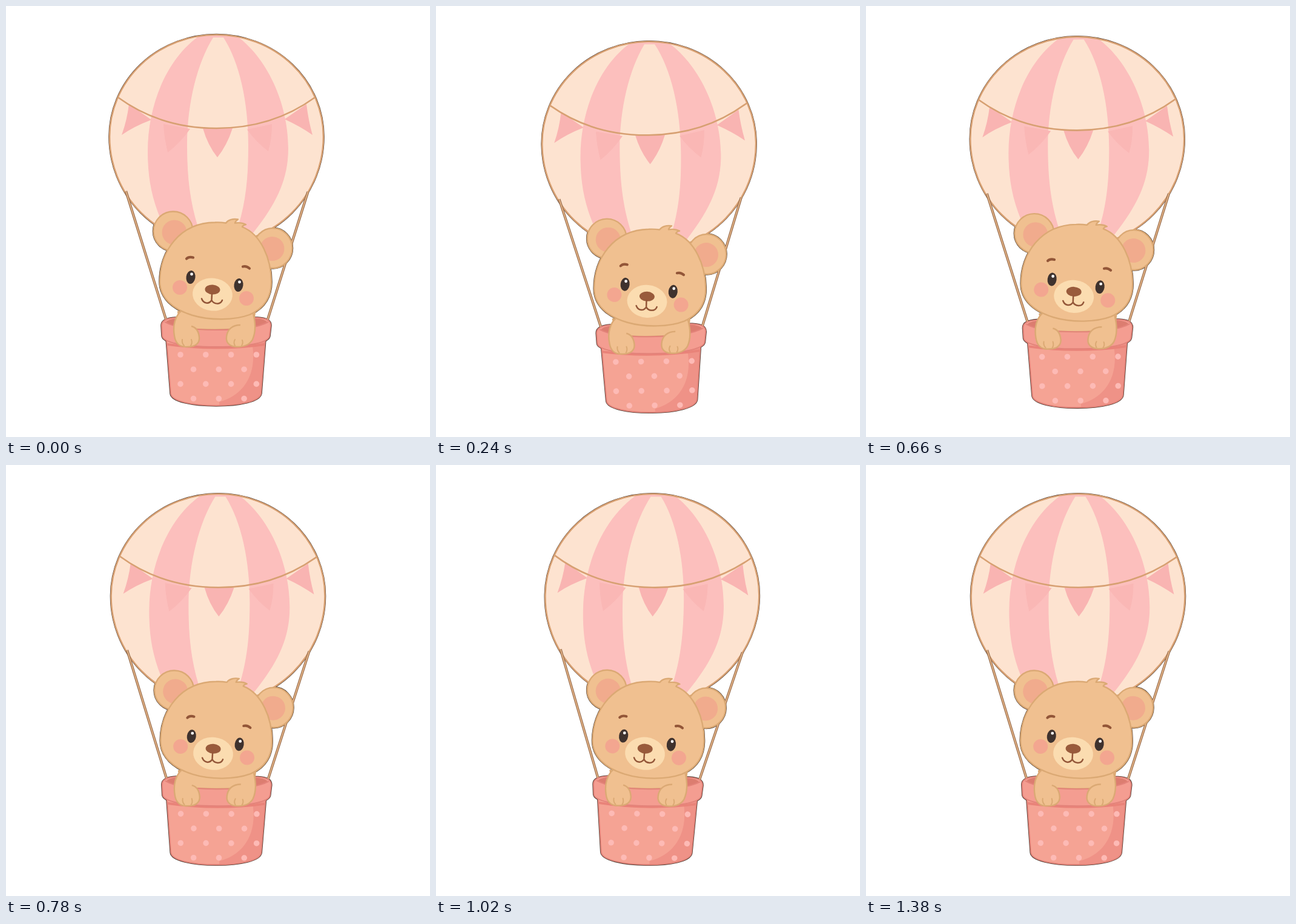
Recreate the animation shown at these times as an HTML page. Size 700 by 712 pixels, loop 1.44 s.

```html
<!DOCTYPE html>
<html lang="en">
<head>
<meta charset="utf-8">
<title>Bear in a balloon</title>
<style>
html, body { margin: 0; width: 100%; height: 100%; overflow: hidden; background: #fff; }
svg { display: block; width: 100vw; height: 100vh; }
.fringe { fill: none; stroke: #4a372d; stroke-width: 3.6; }
.line { fill: none; stroke: #d7a072; stroke-width: 2.6; }
.fur { fill: #f0c090; stroke: #dba974; stroke-width: 2.4; stroke-linejoin: round; }
.stripe { fill: #fcbfbd; }
.flag { fill: #f9b4b2; }
.ear { fill: #f1ab8d; }
.brown { fill: none; stroke: #935638; stroke-width: 2.5; stroke-linecap: round; stroke-linejoin: round; }
.brow { stroke-width: 4.2; }
.rope { fill: none; stroke: #94694a; stroke-width: 4.2; }
.strand { fill: none; stroke: #e3b386; stroke-width: 2; }
.rim { fill: #f49d91; stroke: #e3837a; stroke-width: 2; stroke-linejoin: round; }
.claw { fill: none; stroke: #dba974; stroke-width: 2; stroke-linecap: round; }
</style>
</head>
<body>
<svg viewBox="0 0 700 712">
  <defs>
    <path id="ball" d="M171 216A176.5 168.5 0 0 1 524 216A176.5 177 0 0 1 171 216Z"/>
    <path id="ropes" d="M198 306L264.500 519M498.500 307L431 521"/>
    <circle id="earL" cx="276" cy="372" r="32.500"/>
    <ellipse id="earR" cx="440.500" cy="400" rx="32" ry="33"/>
    <path id="head" d="M254 455C254 405 287 358 345 357.500Q354 357 363 358.500C367 353 375 351 383 352.500Q379 355 378 358.500Q389 357 396 361Q391 362 390 365C421 377 438 418 438 456C438 483 425 500 402 510C378 519 338 520 308 511C275 501 254 482 254 455Z"/>
    <path id="pot" d="M265 550L272 640C273 653 308 660 347 660S419 653 421 640L428 550Z"/>
    <path id="rim" d="M257 528C257 519 266 516 280 515L415 515C430 516 437 519 437 528L435 545C434 555 405 563 347 563S259 555 258 545Z"/>
    <clipPath id="inBall"><use href="#ball"/></clipPath>
    <clipPath id="inPot"><use href="#pot"/></clipPath>
  </defs>
  <rect width="700" height="712" fill="#fff"/>
  <g id="scene">
    <g class="fringe">
      <use href="#ball"/><use href="#earL"/><use href="#earR"/>
      <use href="#head"/><use href="#pot"/><use href="#rim"/>
    </g>

    <use href="#ball" fill="#fde3d0"/>
    <g clip-path="url(#inBall)">
      <path class="stripe" d="M324 46C268 82 234 160 234 240C234 290 242 328 268 380L322 380C304 330 299 285 299 230C299 160 316 94 342 52H359C386 94 400 160 400 230C400 285 396 330 378 380L404 380C444 330 466 290 466 235C466 160 430 82 376 46Z"/>
      <path class="flag" d="M203 162L240 188Q211 199 191 213Q200 188 203 162Z
        M325 202H374Q365 230 349 250Q333 230 325 202Z
        M460 187L496 162Q499 188 506 213Q486 199 460 187Z"/>
      <path fill="#fab7b5" d="M260 195L304 203Q288 226 267 242Q261 218 260 195Z
        M398 204L439 195Q439 220 433 240Q412 224 398 204Z"/>
      <path class="line" d="M185 151Q255 202 347.500 202T510 151"/>
    </g>
    <use href="#ball" class="line"/>
    <use href="#ropes" class="rope"/>
    <use href="#ropes" class="strand"/>

    <use href="#pot" fill="#f5a394"/>
    <g clip-path="url(#inPot)">
      <path fill="#ef9287" d="M430 550L407 562C414 612 390 644 352 654V662H430Z"/>
      <path fill="none" stroke="#e98379" stroke-width="4" d="M260 558Q347 571 434 558"/>
      <g id="dots" fill="#fdbab5"></g>
    </g>
    <use href="#pot" fill="none" stroke="#e5857b" stroke-width="2"/>
    <use href="#rim" class="rim"/>
    <path fill="#dc7d70" d="M264 522Q270 516 290 516H405Q426 516 431 522Q410 535 347 535T264 522Z"/>

    <path class="fur" stroke="none" d="M284 505H411L408 531Q347 538 290 532Z"/>
    <path fill="none" stroke="#e3837a" stroke-width="2" d="M262 522Q285 535 347 535T433 522"/>
    <path class="fur" d="M290 503C279 512 275 528 278 545C280 559 289 564 300 563C314 563 320 556 319 547C318 537 314 531 306 529"/>
    <path class="fur" d="M408 508C413 527 411 542 407 551C402 560 392 563 382 563C369 563 363 556 364 547C365 534 374 527 387 527"/>
    <path class="claw" d="M291 551Q290 557 294 561M306 551Q308 557 305 561M378 551Q375 556 378 561M390 552Q392 557 389 561"/>

    <use href="#earL" class="fur"/>
    <use href="#earR" class="fur"/>
    <circle class="ear" cx="278" cy="374" r="20.500"/>
    <circle class="ear" cx="439.500" cy="401" r="20"/>
    <use href="#head" class="fur"/>

    <circle cx="287" cy="465" r="12" fill="#f3a690"/>
    <circle cx="397" cy="483" r="12" fill="#f3a690"/>
    <ellipse cx="341" cy="476.500" rx="33" ry="27" fill="#fbdcb0" transform="rotate(6 341 476)"/>
    <ellipse cx="341" cy="468.500" rx="12.500" ry="8" fill="#995b3c" transform="rotate(4 341 468)"/>
    <path class="brown" d="M340 475L339.500 485M323 483.500C326 492 335 493 339.500 486C343 493 354 494 357 486"/>
    <path class="brown brow" d="M298 417.500Q302 413.500 309 415.500M391 430.500Q397 429 402 433.500"/>
    <g fill="#3f322e">
      <ellipse cx="305" cy="448" rx="7.500" ry="11" transform="rotate(8 305 448)"/>
      <ellipse cx="384" cy="461" rx="7.500" ry="11" transform="rotate(8 384 461)"/>
    </g>
    <circle cx="306.500" cy="443" r="2.400" fill="#fff"/>
    <circle cx="385.500" cy="456" r="2.400" fill="#fff"/>
  </g>
</svg>
<script>
const LOOP = 1440, HALF = LOOP / 2, STEP = 60;
const scene = document.getElementById('scene');

// Four staggered rows of polka dots
document.getElementById('dots').innerHTML = [0, 1, 2, 3].map(row => {
  const odd = row % 2;
  return Array.from({ length: 4 - odd }, (_, i) =>
    `<circle cx="${288 + 21.5 * odd + 41.8 * i}" cy="${576 + 24.2 * row}" r="4.8"/>`).join('');
}).join('');

// First half: dip and lean left; second half: sway and lean right
function pose(t) {
  const p = (t % HALF) / HALF * Math.PI, s = Math.sin(p);
  return t < HALF
    ? { x: 4.8 * s, y: 13 * s, turn: -0.85 * s, skew: 0 }
    : { x: 9.7 * s, y: 1.2 * Math.sin(2 * p) ** 2, turn: 0.8 * s, skew: -0.4 * s };
}

function draw(now) {
  const t = Math.floor(now % LOOP / STEP) * STEP;
  const { x, y, turn, skew } = pose(t);
  scene.setAttribute('transform',
    `translate(${348 + x} ${215 + y}) rotate(${turn}) skewX(${skew}) translate(-348 -215)`);
  requestAnimationFrame(draw);
}
draw(performance.now());
</script>
</body>
</html>
```
